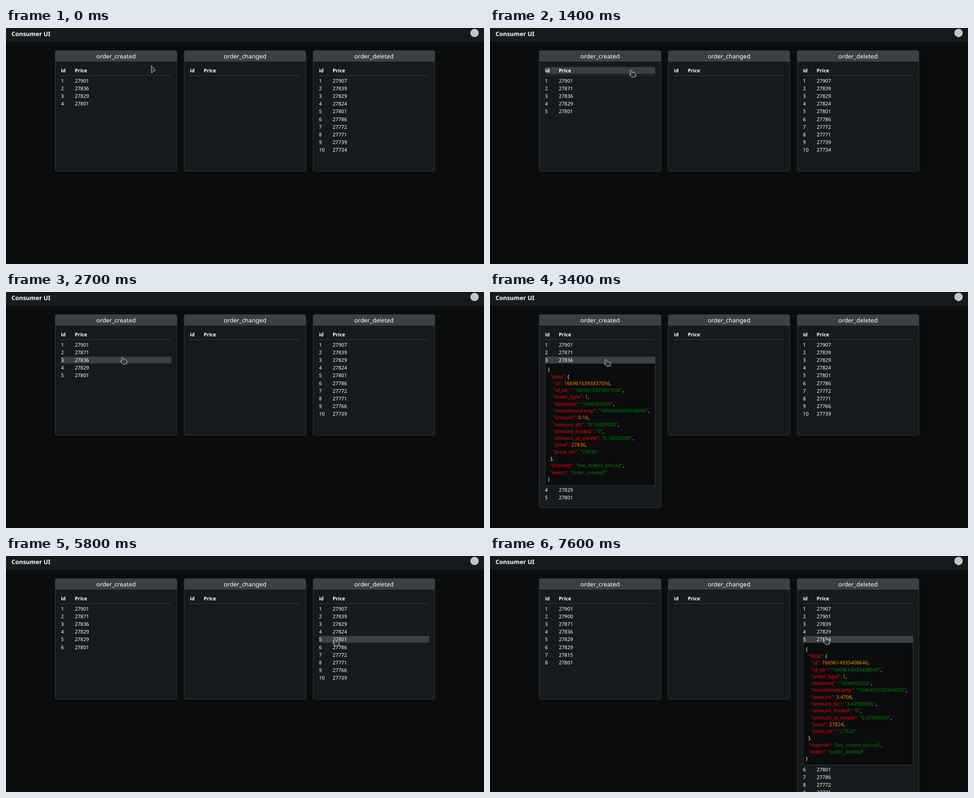
Animation, 1063 px wide and 527 px high, one loop 8 s. Source, as an HTML page:

```html
<!DOCTYPE html>
<html lang="en">
<head>
<meta charset="utf-8">
<title>Consumer UI</title>
<style>
  html, body { margin: 0; width: 100%; height: 100%; overflow: hidden; background: #0b0c0d; }
  svg {
    display: block; width: 1063px; height: 527px; fill: #fff;
    font: 11.116px "Noto Sans", sans-serif; text-rendering: geometricPrecision;
  }
  .page { fill: #0b0c0d; }
  .panel { fill: #171a1c; }
  .edge { stroke: #353c40; }
  .bar { fill: #394145; }
  .big { font-size: 13.34px; }
  .bold { font-weight: bold; }
  .mid { text-anchor: middle; }
  .logo { fill: #c3c6c8; }
  .key { fill: red; }
  .str { fill: green; }
  .num { fill: darkorange; }
  .cursor { fill: #2e3440; stroke: #d0d6e2; stroke-linejoin: round; }
</style>
</head>
<body>
<svg id="stage" viewBox="0 0 1063 527"></svg>
<script>
const LOOP = 8000, STEP = 100;
const COL_X = 109.5, COL_PITCH = 286.8, COL_W = 270.6;
const ROWS_TOP = 109.9, HEAD_TOP = 87.3, PITCH = 17.17;
const ROW_W = 245.4, ROW_H = 15.285, ASCENT = 11.81, DETAIL_H = 273.1;

const columns = [
  { title: 'order_created', prices: [27901, 27836, 27829, 27801] },
  { title: 'order_changed', prices: [] },
  { title: 'order_deleted',
    prices: [27907, 27839, 27829, 27824, 27801, 27786, 27772, 27771, 27739, 27734] }
];

const arrivals = [
  { at: 1100, col: 0, price: 27871 },
  { at: 2200, col: 2, price: 27766 },
  { at: 5800, col: 0, price: 27829 },
  { at: 6500, col: 0, price: 27900 },
  { at: 6500, col: 2, price: 27901 },
  { at: 7300, col: 0, price: 27815 }
];

// Each move eases the pointer tip to (x, y) between two times.
const moves = [
  { from: 200, to: 700, x: 372.5, y: 93.3 },
  { from: 1100, to: 1600, x: 293, y: 94.3 },
  { from: 1900, to: 2200, x: 260.4, y: 132.2 },
  { from: 2600, to: 2800, x: 257.5, y: 150.5 },
  { from: 5800, to: 5800, x: 730.5, y: 185.5 },
  { from: 7300, to: 7300, x: 744.5, y: 182 }
];

const details = [
  { from: 3400, to: 4800, col: 0, row: 2,
    order: order('1669615393837056', '1696455920418000', 0.16, 27836, 'order_created') },
  { from: 7600, to: LOOP, col: 2, row: 4,
    order: order('1669614935408640', '1696455920444000', 3.4708, 27824, 'order_deleted') }
];

function order(id, micro, amount, price, event) {
  const full = amount.toFixed(8);
  return {
    data: {
      id: +id, id_str: id, order_type: 1, datetime: micro.slice(0, 10), microtimestamp: micro,
      amount, amount_str: full, amount_traded: '0', amount_at_create: full,
      price, price_str: String(price)
    },
    channel: 'live_orders_btcusd', event
  };
}

const rect = (x, y, w, h, cls, r = 0) =>
  `<rect x="${x}" y="${y}" width="${w}" height="${h}" rx="${r}" class="${cls}"/>`;
const text = (x, y, s, cls = '') => `<text x="${x}" y="${y}" class="${cls}">${s}</text>`;

function json(value, x, y) {
  const token = /("\w+":)|("[^"]*")|(\d[\d.]*)/g;
  const paint = (m, key, str) =>
    `<tspan class="${key ? 'key' : str ? 'str' : 'num'}">${m}</tspan>`;
  return JSON.stringify(value, null, 2).split('\n').map((line, i) => {
    const body = line.trimStart();
    const indent = (line.length - body.length) * 2.89;
    return text(x + indent, y + i * ROW_H, body.replace(token, paint));
  }).join('');
}

function tipAt(t) {
  let x = 322.5, y = 84;
  for (const m of moves) {
    if (t < m.from) break;
    const p = Math.min(1, (t - m.from + STEP) / (m.to - m.from + STEP));
    const k = p * p * (3 - 2 * p);
    x += (m.x - x) * k;
    y += (m.y - y) * k;
  }
  return { x, y };
}

function pricesAt(t, col) {
  const added = arrivals.filter(a => a.col === col && t >= a.at).map(a => a.price);
  return columns[col].prices.concat(added).sort((a, b) => b - a).slice(0, 10);
}

const hits = (tip, x, y) =>
  tip.x >= x && tip.x <= x + ROW_W && tip.y >= y && tip.y <= y + ROW_H;

function drawColumn(t, col, tip) {
  const x = COL_X + col * COL_PITCH;
  const left = x + 12.8, priceX = x + 43.4;
  const prices = pricesAt(t, col);
  const open = details.find(d => d.col === col && t >= d.from && t < d.to);
  const end = ROWS_TOP + (prices.length - 1) * PITCH + ROW_H + 14.4 + (open ? DETAIL_H : 0);
  let hot = false;

  function row(y, id, price, cls, isOpen) {
    let s = '';
    if (hits(tip, left, y)) {
      hot = true;
      s += rect(left, y, ROW_W, ROW_H, 'bar', 3.5);
      if (isOpen) s += rect(left, y + 8, ROW_W, ROW_H - 8, 'bar');
    }
    return s + text(left, y + ASCENT, id, cls) + text(priceX, y + ASCENT, price, cls);
  }

  let out = rect(x, 50.5, COL_W, Math.max(319.5, end) - 50.5, 'panel edge', 3.5);
  out += `<path class="bar" d="M${x} 75V54q0-3.5 3.5-3.5h${COL_W - 7}q3.5 0 3.5 3.5V75z"/>`;
  out += text(x + COL_W / 2, 67.8, columns[col].title, 'big mid');
  out += row(HEAD_TOP, 'id', 'Price', 'bold');
  out += rect(left, 105.6, ROW_W, 0.9, 'bar');

  prices.forEach((price, i) => {
    const y = ROWS_TOP + i * PITCH + (open && i > open.row ? DETAIL_H : 0);
    const isOpen = open && i === open.row;
    if (isOpen) {
      out += rect(left + 0.4, y + 8, ROW_W - 0.8, 280.1, 'page edge', 3.5);
      out += json(open.order, left + 6.4, y + 33.1);
    }
    out += row(y, i + 1, price, '', isOpen);
  });
  return { out, hot };
}

const ARROW = 'M.3.3L9.7 9.6Q10 11.2 8.6 11.4L5.6 12 2.6 16.2Q1.2 17.2.8 15.6z';
const HAND = 'M-1.8 1.6Q-1.4-.2.4.3 1.5.8 1.9 2.4L2.7 5.4 4.6 4.9 6.4 5.4 8.3 5.5 9.9 6.9' +
  ' 10.7 10.2 10.6 14.4 3.2 16.1-.4 13.2-4 9.4Q-3.8 7.7-1.8 8.4L-.4 9z';

function draw(t) {
  const tip = tipAt(t);
  const cols = columns.map((_, i) => drawColumn(t, i, tip));
  const shape = t >= 1900 || cols.some(c => c.hot) ? HAND : ARROW;
  return rect(0, 0, 1063, 31, 'panel') +
    text(12.2, 18.1, 'Consumer UI', 'big bold') +
    '<circle class="logo" cx="1042" cy="11" r="9.3"/>' +
    cols.map(c => c.out).join('') +
    `<path class="cursor" transform="translate(${tip.x} ${tip.y})" d="${shape}"/>`;
}

const stage = document.getElementById('stage');
const start = performance.now();
let last = -1;

function tick() {
  const t = (performance.now() - start) % LOOP;
  const step = Math.floor(t / STEP);
  if (step !== last) {
    last = step;
    stage.innerHTML = draw(step * STEP);
  }
  requestAnimationFrame(tick);
}
tick();
</script>
</body>
</html>
```
